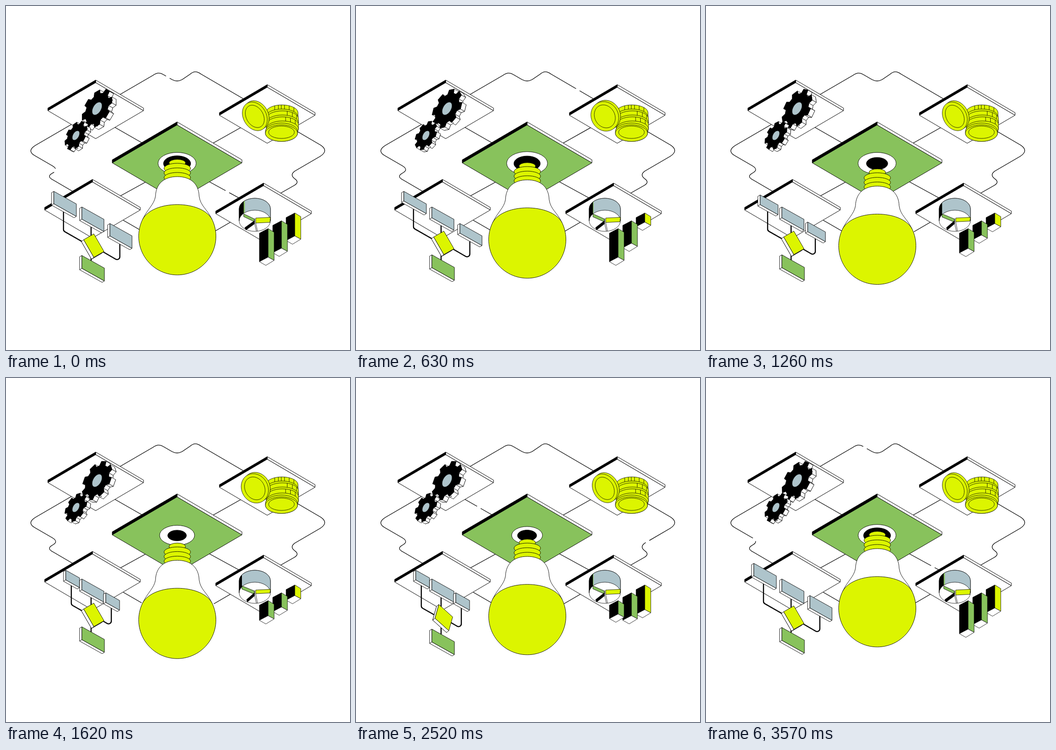
Animation, 748 px wide and 748 px high, one loop 3600 ms. Source, as an HTML page with a canvas:

```html
<!DOCTYPE html>
<html lang="en">
<head>
<meta charset="utf-8">
<title>Idea network</title>
<style>
html, body { margin: 0; width: 100%; height: 100%; overflow: hidden; background: #fff; }
canvas { display: block; width: 748px; height: 748px; }
</style>
</head>
<body>
<canvas id="stage" width="748" height="748"></canvas>
<script>
const LOOP = 3600, TAU = Math.PI * 2;
const LIME = '#dcf500', GREEN = '#88c25c', BLUE = '#aec4cb', INK = '#000', WHITE = '#fff';
const c = document.getElementById('stage').getContext('2d');

const mix = (a, b, k) => a + (b - a) * k;
const wave = (t, peak, period = LOOP) => Math.cos((t - peak) / period * TAU);

// Eased keyframes given as time, value, time, value ...
function keys(t, ...k) {
  for (let i = 2; i < k.length; i += 2) {
    if (t < k[i]) {
      const u = Math.max(0, (t - k[i - 2]) / (k[i] - k[i - 2]));
      return mix(k[i - 1], k[i + 1], (1 - Math.cos(u * Math.PI)) / 2);
    }
  }
  return k[k.length - 1];
}

function paint(fill, path) {
  if (fill) { c.fillStyle = fill; path ? c.fill(path) : c.fill(); }
  path ? c.stroke(path) : c.stroke();
}
function poly(fill, ...p) {
  c.beginPath();
  for (let i = 0; i < p.length; i += 2) c.lineTo(p[i], p[i + 1]);
  c.closePath();
  paint(fill);
}
function oval(fill, x, y, rx, ry, rot = 0) {
  c.beginPath();
  c.ellipse(x, y, rx, ry, rot, 0, TAU);
  paint(fill);
}
function line(...p) {
  c.beginPath();
  for (let i = 0; i < p.length; i += 2) c.lineTo(p[i], p[i + 1]);
  c.stroke();
}

// Wires: path, time a gap enters it, gap speed in px per ms
const wires = [
  ['M240,197L320,150.5Q331,142 342,149L361,160Q372,166 383,160L400,148.5Q411,138 424,148L520,204', 3077, .235],
  ['M590,411L627,390Q639,383 627,375Q617,367 628,359L683,327Q702,315 685,303L620,265', 2220, .28],
  ['M150,253L64,303Q45,315 62,325L100,347Q116,356 100,364Q88,371 102,378L150,406', 2923, .27],
  ['M300,300L230,260', 2402, .28],
  ['M515,422L440,381', 3526, .45],
  ['M440,304L520,259', 317, .28],
  ['M250,463L295,489'],
  ['M495,466L452,491'],
  ['M305,382L245,415']
].map(([d, start, speed]) => ({ path: new Path2D(d), start, speed }));

function drawWires(t) {
  c.lineWidth = 1.3;
  for (const w of wires) {
    if (w.speed) c.setLineDash([(t - w.start + LOOP) % LOOP * w.speed, 9, 9999]);
    c.stroke(w.path);
    c.setLineDash([]);
  }
}

function tile(x, y, w, h, d, fill) {
  poly(fill, x, y + d, x + w, y + h + d, x, y + 2 * h + d, x - w, y + h + d);
  poly(WHITE, x, y, x + w, y + h, x + w, y + h + d, x, y + d);
  poly(INK, x, y, x - w, y + h, x - w, y + h + d, x, y + d);
}

function gear(x, y, r, turn, dx, dy) {
  const pts = [], step = TAU / 8;
  for (let i = 0; i < 8; i++) {
    for (const [off, k] of [[-.34, .79], [-.22, 1], [.22, 1], [.34, .79]]) {
      const a = turn + (i + off) * step;
      const u = Math.cos(a) * r * k, v = Math.sin(a) * r * k;
      pts.push([x + .866 * u, y - .5 * u + v]);
    }
  }
  const n = pts.length;
  poly(WHITE, ...pts.flatMap(p => [p[0] + dx, p[1] + dy]));
  pts.forEach((p, i) => {
    const q = pts[(i + 1) % n];
    if ((q[1] - p[1]) * dx - (q[0] - p[0]) * dy > 0)
      poly(WHITE, ...p, ...q, q[0] + dx, q[1] + dy, p[0] + dx, p[1] + dy);
  });
  poly(INK, ...pts.flat());
  c.beginPath();
  for (let a = 0; a < TAU; a += .15) {
    const u = Math.cos(a) * r * .33, v = Math.sin(a) * r * .33;
    c.lineTo(x + .866 * u, y - .5 * u + v);
  }
  c.closePath();
  paint(BLUE);
}

function stackCoin(x, y, ry, th, ticks) {
  const rx = 35;
  c.beginPath();
  c.ellipse(x, y, rx, ry, 0, Math.PI, TAU);
  c.ellipse(x, y + th, rx, ry, 0, 0, Math.PI);
  c.closePath();
  paint(LIME);
  for (const k of ticks) {
    const ty = y - ry * Math.sqrt(1 - k * k);
    line(x + k * rx, ty, x + k * rx, ty + th);
  }
  oval(LIME, x, y + th, rx, ry);
}

function drawCoins(t) {
  stackCoin(600, 232, 17, 9, [-.45, -.22, -.04, .16, .45, .74]);
  stackCoin(601, 245, 17, 9, [.3, .62, .88]);
  stackCoin(601, 258, 17, 9, [.2, .5, .8]);
  stackCoin(599, 272.5, 18, 4, []);
  oval(null, 599, 274.5, 28, 13.5);
  const b = mix(25, 29.5, (1 - wave(t, 0, 1200)) / 2), rot = Math.PI / 3;
  oval(LIME, 545, 237, 33, b, rot);
  oval(LIME, 541, 240, 33, b, rot);
  oval(null, 541, 240, 26, b * .74, rot);
}

function drawPie(t) {
  const p = (1 + wave(t, -200)) / 2, x = 541, y = 467, top = 441, rx = 34, ry = 23;
  const split = mix(513, 517, p), yh = mix(8, 11, p), gh = mix(7, 6, p);
  c.beginPath();
  c.ellipse(x, top, rx, ry, 0, Math.PI, TAU);
  c.ellipse(x, y, rx, ry, 0, 0, Math.PI);
  c.closePath();
  paint(WHITE);

  const wall = new Path2D();
  wall.ellipse(x, top, rx, ry, 0, Math.PI, TAU);
  wall.ellipse(x, y, rx, ry, 0, TAU, Math.PI, true);
  wall.closePath();
  c.save();
  c.clip(wall);
  [[BLUE, 500, 80], [GREEN, split, 2.5 * p], [INK, 500, split - 500]].forEach(([f, wx, w]) => {
    c.fillStyle = f;
    c.fillRect(wx, 410, w, 70);
  });
  c.restore();
  c.stroke(wall);

  poly(GREEN, split, 452, 540, 463, 540, 463 + gh, split, 452 + gh);
  poly(LIME, 543, 461, 575, 459.5, 574, 459.5 + yh, 543, 461 + yh);
  poly(INK, mix(523, 519, p), 482, 540, 467, 540, 474, mix(525, 522, p), 487);
  line(541, 462, 541, 475, 544.5, 490);
  line(543, 461 + yh, 547, 490);
}

function bar(x, top, tip, fill) {
  const m = tip - 18;
  poly(INK, x - 19, top + 10, x, top, x, m, x - 19, m + 10);
  poly(fill, x, top, x + 13, top + 8, x + 13, m + 7, x, m);
  poly(WHITE, x - 19, m + 10, x, m, x + 13, m + 7, x - 5, tip);
}

function drawBars(t) {
  bar(628, 450, keys(t, 250, 518, 680, 487, 880, 491, 1750, 491, 2420, 523, 2700, 518), LIME);
  bar(599, 467, keys(t, 480, 544.5, 880, 510, 1150, 516, 2200, 516, 2780, 548, 3080, 544), GREEN);
  bar(570, 484, keys(t, 1030, 564, 1450, 531, 1700, 536, 2250, 536, 2470, 530, 2930, 570, 3200, 564), GREEN);
}

function panel(x, y, w, h, fill) {
  const s = w * .56;
  poly(WHITE, x, y, x - 5, y + 3, x - 5, y + h + 3, x + w - 5, y + h + s + 3, x + w, y + h + s, x, y + h);
  line(x, y + h, x - 5, y + h + 3);
  poly(fill, x, y, x + w, y + s, x + w, y + s + h, x, y + h);
}

function drawChart(t) {
  const q = keys(t, 950, 0, 1550, 1, 2520, 1, 3120, 0);
  const drop = keys(t, 0, 6, 330, 0, 2200, 0, 2480, 6);
  const sink = keys(t, 0, 1.5, 150, 0, 2200, 0, 2450, 5, 3200, 5, 3600, 1.5);
  const ax = mix(125, 142, q), ay = 508 + drop - (168 - ax) * .577;
  const cx = mix(247.5, 229, q), cy = 528 + drop + (cx - 210) * .577;
  const side = 21 + drop * (1 - q);

  c.lineWidth = 2.4;
  c.beginPath();
  c.moveTo(ax, 438);
  c.arcTo(ax, ay, 172, 510 + drop, 6);
  c.lineTo(172, 510 + drop);
  c.moveTo(185, 475);
  c.lineTo(185, 560);
  c.moveTo(cx, 495);
  c.arcTo(cx, cy, 205, 525 + drop, 6);
  c.lineTo(205, 525 + drop);
  c.stroke();

  c.lineWidth = .9;
  panel(mix(104, 130, q), mix(403, 418, q), mix(49, 30, q), side, BLUE);
  panel(165, 437, 48, 23.5 + (side - 21) / 2, BLUE);
  panel(mix(226, 217, q), mix(473, 467, q), mix(48, 30, q), side, BLUE);
  panel(165, 541 + sink, 49, 28, GREEN);

  const turn = keys(t, 2250, 0, 2950, -Math.PI / 2), pts = [];
  for (let i = 0; i < 4; i++) {
    const a = turn + i * Math.PI / 2, u = Math.cos(a) * 25.5, v = Math.sin(a) * 25.5;
    pts.push([191 + .866 * u, 515 + drop + .5 * u + v]);
  }
  const back = pts.map(([x, y]) => [x - 5, y + 4]);
  poly(WHITE, ...back.flat());
  pts.forEach((p, i) => {
    const j = (i + 1) % 4, e = pts[j];
    if ((e[1] - p[1]) * -5 - (e[0] - p[0]) * 4 > 0) poly(WHITE, ...p, ...e, ...back[j], ...back[i]);
  });
  poly(LIME, ...pts.flat());
}

const glass = new Path2D('M297,464C308,441 322,432 325,414C326,385 345,371 372.5,371C400,371 419,385 420,414C423,435 437,441 448,464Z');
const globe = new Path2D('M297,464C320,421 425,421 448,464A84,84 0 1 1 297,464Z');

function drawBulb(t) {
  const outer = 38.9 + 5.5 * wave(t, 630), inner = 24.5 + 5.5 * wave(t, 230);
  oval(WHITE, 372, 342, outer, outer * .57);
  oval(INK, 372, 342.5, inner, inner * .57);
  c.save();
  c.translate(0, 13 - 13 * wave(t, 0));
  oval(LIME, 372.5, 341, 18, 7.5);
  for (let i = 0; i < 3; i++) oval(LIME, 372.5, 353 + i * 10, 28.8, 11);
  paint(WHITE, glass);
  paint(LIME, globe);
  c.restore();
}

function draw(t) {
  c.fillStyle = WHITE;
  c.fillRect(0, 0, 748, 748);
  c.strokeStyle = INK;
  c.lineJoin = 'round';
  drawWires(t);
  c.lineWidth = 1;
  for (const [x, y] of [[195, 161], [568, 171], [188, 377], [560, 385]]) tile(x, y, 104, 61, 5.5, WHITE);
  tile(372, 252, 141, 82.5, 6.5, GREEN);
  c.lineWidth = .8;
  const turn = t / LOOP * TAU;
  gear(198, 223, 38, turn, 9, 5);
  gear(152, 281.5, 28, -.09 - turn, 8, 4.5);
  drawCoins(t);
  drawPie(t);
  drawBars(t);
  drawChart(t);
  drawBulb(t);
}

const t0 = performance.now();
function tick() {
  draw((performance.now() - t0) % LOOP);
  requestAnimationFrame(tick);
}
tick();
</script>
</body>
</html>
```
